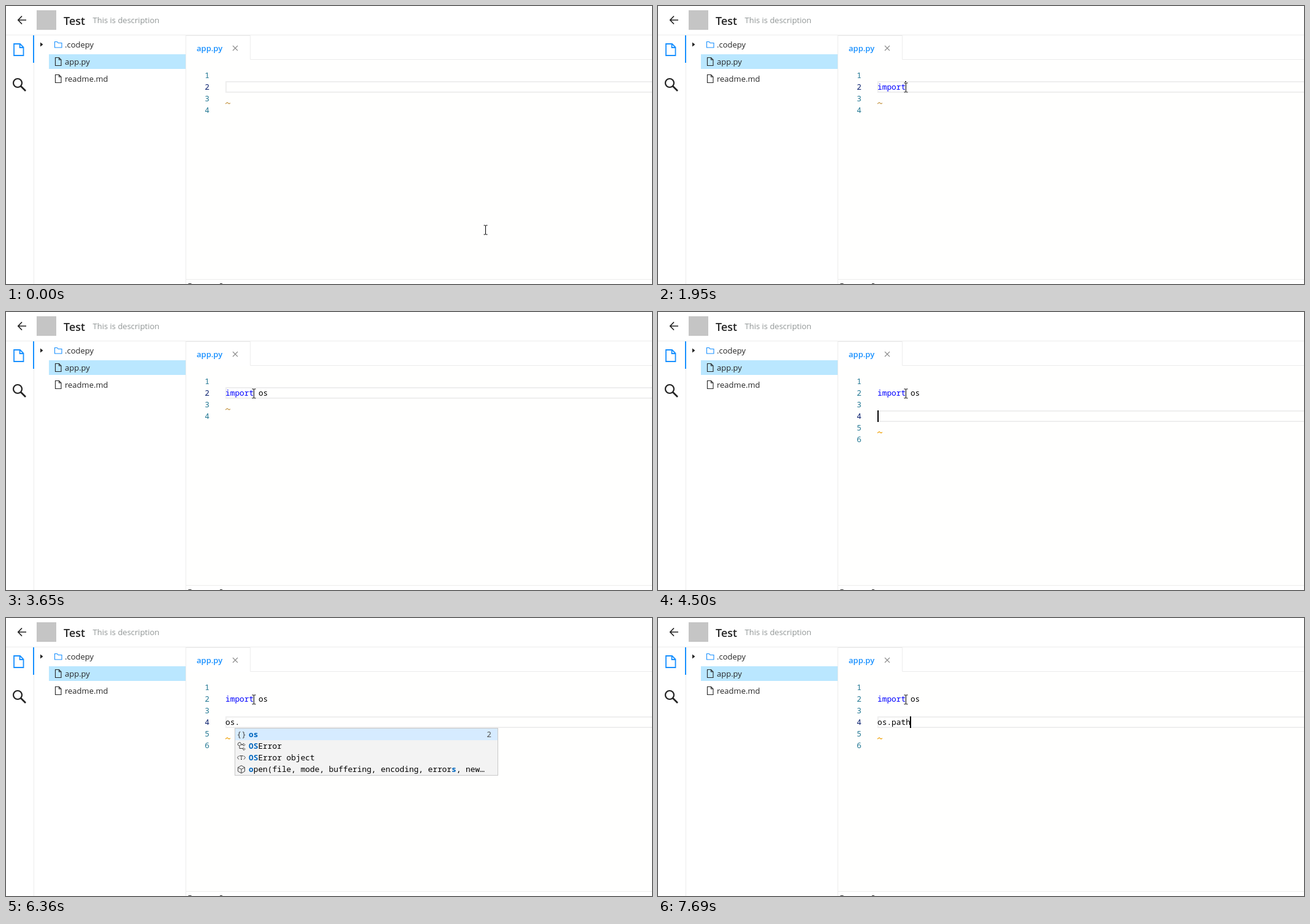
An HTML page for the animation above (8 s loop, 1054x455 px).

```html
<!DOCTYPE html>
<html lang="en">
<head>
<meta charset="utf-8">
<title>Code completion</title>
<style>
  html, body { margin: 0; width: 100%; height: 100%; overflow: hidden; background: #fff; }
  svg { display: block; }
  text { font: 13px "Open Sans", "Noto Sans", sans-serif; fill: #262626; }
  .code text { font: 12.83px "Noto Sans Mono", "DejaVu Sans Mono", monospace; fill: #000; white-space: pre; }
  .code .num { fill: #237893; text-anchor: end; }
  .code .now { fill: #0b216f; }
  .code .key { fill: #00f; }
  .code .hit { fill: #0066bf; font-weight: 700; }
  .code .icon { fill: #424242; }
  .code .detail { fill: #555; text-anchor: end; }
  .line { fill: none; stroke: #424242; }
</style>
</head>
<body>
<svg width="1054" height="455">
  <defs>
    <path id="file" d="M.5 .5h6l3.5 3.5v9.500h-9.500zM6.500 .5v3.500h3.500" fill="none" stroke="#262626" stroke-width="1.1"/>
  </defs>

  <!-- Header -->
  <path d="M0 47.500H1054" stroke="#ececec"/>
  <path d="M33 23H20M26 16.500L19.800 23 26 29.500" fill="none" stroke="#222" stroke-width="1.700"/>
  <rect x="50" y="7" width="32" height="32" fill="#c5c5c5"/>
  <text x="94" y="30.500" style="font-size:18px;font-weight:600">Test</text>
  <text x="141.500" y="28" style="fill:#909595">This is description</text>

  <!-- Activity bar -->
  <path d="M45.500 48V455M293.500 48V455" stroke="#ececec"/>
  <rect x="44" y="48" width="2" height="45" fill="#1890ff"/>
  <path d="M13 62h10l5.500 5.500V81H13zM22.500 62v6h6" fill="none" stroke="#1890ff" stroke-width="1.800"/>
  <g fill="none" stroke="#222" stroke-width="2.200">
    <circle cx="19" cy="126" r="7"/>
    <path d="M24 131l8 8" stroke-width="2.600"/>
  </g>

  <!-- File tree -->
  <path d="M56 59.500l4.500 3.500-4.500 3.500z" fill="#222"/>
  <path d="M79.500 58.500h4l1.500 2h6v7.500h-11.500z" fill="none" stroke="#1890ff" stroke-width="1.100"/>
  <rect x="70" y="79" width="223" height="24" fill="#bae7ff"/>
  <use href="#file" x="80" y="84"/>
  <use href="#file" x="80" y="112"/>
  <text x="96" y="68">.codepy</text>
  <text x="96" y="96">app.py</text>
  <text x="96" y="124">readme.md</text>

  <!-- Editor frame -->
  <rect x="294" y="88" width="760" height="359" fill="#fffffe"/>
  <path d="M294 48.500H398.500V87.500H1054M294 447.500H1054" fill="none" stroke="#ececec"/>
  <text x="311" y="73.500" style="fill:#1890ff;font-weight:600">app.py</text>
  <path d="M370 65l8 8M378 65l-8 8" stroke="#8c8c8c" stroke-width="1.100"/>
  <path d="M297.500 454.500h5M349 454.500h4" stroke="#333"/>

  <g id="view" class="code"></g>
</svg>
<script>
const LOOP = 8000, LEFT = 358, ROW = 19, CHAR = 7.7, TOP = 104;
const view = document.getElementById('view');

// Rows are "icon|label"; brackets mark the matched letters.
const popups = {
  im: { col: 2, detail: '', pick: 0, rows: [
    'key|[im]port', 'class|[Im]portError', 'class|[Im]portWarning',
    'type|[Im]portError object', 'type|[Im]portWarning object', 'cube|__[im]port__(name, globals, locals)'] },
  o: { col: 8, detail: 'os', pick: 7, rows:
    'auth lefile pcode perator pt ptparse rca s ssaudiodev'.split(' ').map(s => 'mod|[o]' + s) },
  os: { col: 9, detail: 'os', pick: 0, rows: ['mod|[os]', 'mod|[os]saudiodev', 'mod|[o]ptpar[s]e'] },
  name: { col: 2, detail: '2', pick: 0, rows: [
    'mod|[os]', 'class|[OS]Error', 'type|[OS]Error object',
    'cube|[o]pen(file, mode, buffering, encoding, error[s], new…'] },
  p: { col: 4, detail: 'os', pick: 0, rows: [
    'mod|[p]ath', 'key|[p]ardir', 'key|[p]athsep', 'class|[P]athLike', 'cube|[p]athconf(path, name)',
    'cube|[p]ipe()', 'cube|[p]ipe2(flags)', 'cube|[p]lock(op)', 'cube|[p]open(cmd, mode, buffering)',
    'cube|[p]read(fd, buffersize, offset)', 'cube|[p]utenv(key, value)', 'cube|[p]write(fd, string, offset)'] }
};

const icons = {
  class: 'M2 2l3-1 2 3-3 3-3-2zM6 5h3M4 7v4h5M9 4l2-1 2 2-2 2zM9 11l2-1 2 2-2 2z',
  type: 'M3 4L.5 7 3 10M11 4l2.500 3L11 10M4.500 5V4h5v1M7 4v6M6 10h2',
  cube: 'M7 1l5.500 3v6.500L7 13.500 1.500 10.500V4zM1.500 4L7 7l5.500-3M7 7v6.500',
  key: 'M1.500 2.500h11v9h-11zM4 5h6M4 7h4M4 9h6'
};

// [start, text up to the caret, caret shown, popup]
const first = '\nimport os', body = first + '\n\n';
const steps = [
  [0, '\n', 0], [380, '\n', 1], [940, '\n', 0],
  [1080, '\ni', 1], [1240, '\nim', 1], [1310, '\nim', 1, 'im'], [1720, '\nim', 0, 'im'],
  [1950, '\nimport', 1], [2250, '\nimport ', 1], [2720, '\nimport o', 1], [2780, '\nimport o', 1, 'o'],
  [2870, first, 1, 'os'], [3420, first, 0, 'os'], [3650, first, 0], [3880, first, 1],
  [4020, first + '\n', 1], [4500, body, 1], [4800, body + 'o', 1],
  [4970, body + 'os', 1, 'name'], [5430, body + 'os', 0, 'name'],
  [5930, body + 'os.', 1, 'name'], [6360, body + 'os.', 0, 'name'],
  [6900, body + 'os.p', 1, 'name'], [7050, body + 'os.p', 1], [7140, body + 'os.p', 1, 'p'],
  [7460, body + 'os.p', 0, 'p'], [7690, body + 'os.path', 1]
];

const rect = (x, y, w, h, fill) => `<rect x="${x}" y="${y}" width="${w}" height="${h}" fill="${fill}"/>`;
const text = (x, y, s, cls = '') => `<text x="${x}" y="${y}" class="${cls}">${s}</text>`;
const span = (s, cls) => `<tspan class="${cls}">${s}</tspan>`;
const squiggle = (x, y, color) =>
  `<path d="M${x} ${y + 1}l3-2 3 2 2-1.300" fill="none" stroke="${color}" stroke-width="1.100"/>`;

function popup({ col, detail, pick, rows }, y) {
  const w = 430, h = Math.min(rows.length * ROW + 2, 224);
  const items = rows.map((row, i) => {
    const [icon, label] = row.split('|'), top = 1 + i * ROW, base = top + 14;
    return (i === pick ? rect(1, top, w - 2, ROW, '#d6ebff') + text(419, base, detail, 'detail') : '')
      + (icons[icon]
        ? `<path class="line" transform="translate(4 ${top + 2.5})" d="${icons[icon]}"/>`
        : text(3.5, base, '{}', 'icon'))
      + text(23, base, label.replace(/\[(\w+)\]/g, (_, s) => span(s, 'hit')));
  }).join('');
  return `<svg x="${Math.round(LEFT + col * CHAR)}" y="${y}" width="${w}" height="${h}">`
    + rect(0, 0, w, h, '#f3f3f3') + items
    + `<rect x=".5" y=".5" width="${w - 1}" height="${h - 1}" fill="none" stroke="#c8c8c8"/></svg>`;
}

function pointer(t) {
  const k = t < 70 ? 0 : Math.min(5, 1 + Math.floor((t - 70) / 77.5)) / 5;
  const move = k * (2 - k);
  const x = Math.round(782 - 378 * move) + .5, y = Math.round(366 - 233 * move) + .5;
  const d = `M${x - 3} ${y - 7.5}h2.500l.5 .5.5-.5h2.500M${x} ${y - 7}v14M${x - 3} ${y + 7.500}h2.500l.5-.5.5 .5h2.500`;
  const click = t >= 380 && t < 530 ? '<circle cx="402" cy="132" r="12" fill="#ff0" fill-opacity=".47"/>' : '';
  return click + `<path d="${d}" fill="none" stroke="#fff" stroke-width="3"/>`
    + `<path d="${d}" fill="none" stroke="#000"/>`;
}

function scene(t) {
  const [, doc, caret, list] = steps.findLast(s => s[0] <= t);
  const lines = doc.split('\n'), last = lines.length - 1, y = TOP + last * ROW;
  let out = `<rect x="359" y="${y + 1}" width="710" height="${ROW - 2}" fill="none" stroke="#eee" stroke-width="2"/>`;
  for (let i = 0; i < lines.length + 2; i++) {
    const base = TOP + i * ROW + 14;
    out += text(332, base, i + 1, i === last ? 'num now' : 'num');
    if (lines[i]) out += text(LEFT, base, lines[i].replace('import', s => span(s, 'key')));
  }
  out += squiggle(LEFT, y + ROW + 17, last > 1 ? '#f0a30a' : '#c79a4b');
  if (t >= 2720 && t < 3420) out += squiggle(404, y + 16, '#f0a30a');
  if (caret) out += rect(Math.max(LEFT, Math.floor(357.5 + lines[last].length * CHAR)), y, 2, ROW, '#000');
  if (list) out += popup(popups[list], y + ROW);
  return out + pointer(t);
}

let shown;
function frame(now) {
  const next = scene(now % LOOP);
  if (next !== shown) view.innerHTML = shown = next;
  requestAnimationFrame(frame);
}
frame(0);
</script>
</body>
</html>
```
